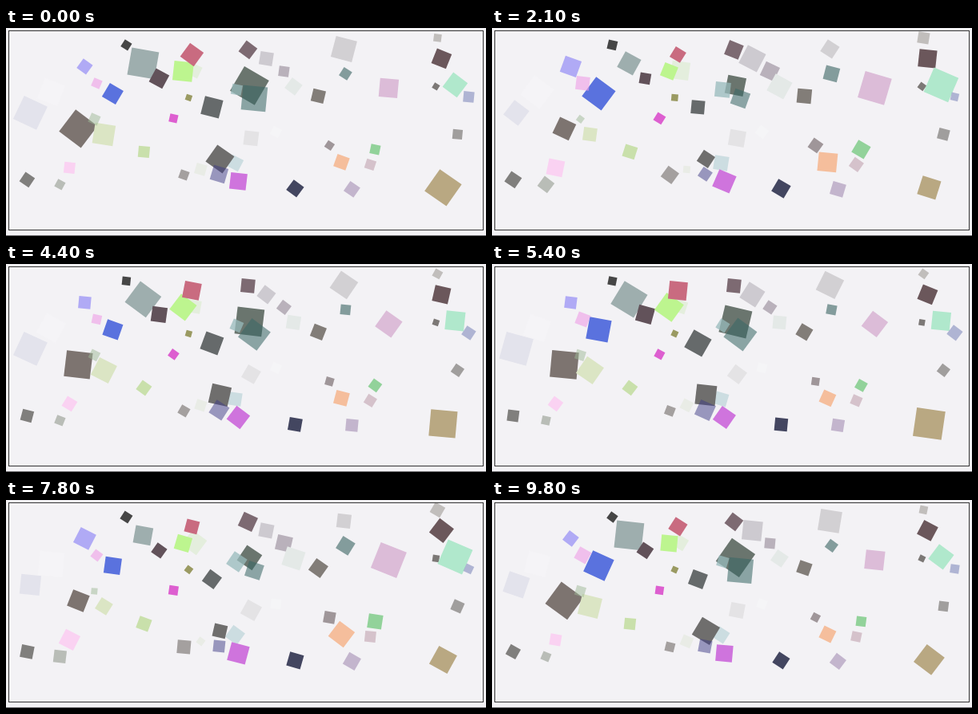
An HTML page with a canvas for the animation above (9900 ms loop, 600x261 px).

```html
<!DOCTYPE html>
<html>
<head>
<meta charset="utf-8">
<style>
html, body { margin: 0; height: 100%; overflow: hidden; background: #f3f2f5; }
canvas { display: block; }
</style>
</head>
<body>
<canvas id="stage" width="600" height="261"></canvas>
<script>
const ctx = document.getElementById('stage').getContext('2d');
const LOOP = 9.9, STEP = 0.1, GOLDEN = 2.4;

// Each group breathes together; a square is [x, y, mean size, colour].
const groups = [
  { swing: 0.06, peak: 2.5, period: 5, squares: [
    [56, 80, 29, '#f5f4f7'], [150, 21, 11, '#464646'], [172, 155, 15, '#c9e0ab'],
    [26, 190, 15, '#807f7d'], [228, 87, 8, '#9a9a62'], [209, 113, 11, '#dd5fd0'],
    [302, 27, 18, '#7d6a72'], [306, 138, 19, '#e4e3e5'], [337, 130, 12, '#f5f5f7'],
    [286, 169, 17, '#ccdde1'], [290, 192, 22, '#cf74dd'], [361, 201, 17, '#434660'],
    [390, 85, 17, '#827d78'], [455, 171, 13, '#d5c2cb'], [432, 202, 16, '#c3b5cd'],
    [564, 133, 13, '#a09e9d'], [537, 73, 8, '#7c7876'], [544, 38, 21, '#6b575b'],
  ] },
  { swing: 0.23, peak: 0, period: 5, squares: [
    [171, 44, 28, '#9eaeae'], [90, 126, 28, '#7d7470'], [122, 133, 21, '#dbe5c4'],
    [110, 114, 10, '#9eb89680'], [304, 72, 29, '#6a756e'], [310, 88, 25, '#3968668f'],
    [267, 164, 21, '#6f6e6d'], [243, 177, 11, '#e9ece6'], [422, 26, 22, '#d2d0d3'],
  ] },
  { swing: 0.2, peak: 2.4, period: 5.2, squares: [
    [98, 48, 18, '#b0aaf5'], [79, 175, 17, '#fad2f2'], [67, 196, 13, '#b9bdb7'],
    [235, 53, 19, '#e4eedd'], [347, 54, 16, '#b9b1bb'], [359, 73, 20, '#e4e9e7'],
    [288, 77, 16, '#98babbc0'], [222, 184, 14, '#a4a09f'], [424, 57, 15, '#839c9c'],
    [478, 75, 29, '#dcbcd8'], [404, 147, 12, '#9f9699'], [419, 168, 20, '#f5be9c'],
    [461, 152, 15, '#92d29a'], [561, 71, 28, '#b0e8cc'], [539, 12, 12, '#c1bebc'],
  ] },
  { swing: 0.2, peak: 5.4, period: 6.4, squares: [
    [30, 106, 29, '#e3e3ec'], [191, 63, 17, '#62525a'], [221, 54, 22, '#bdf58f'],
    [232, 33, 19, '#c96b80'], [257, 99, 21, '#666a6b'], [266, 183, 17, '#3e3a8680'],
    [546, 200, 30, '#b9a882'], [578, 86, 12, '#7682b68c'],
  ] },
  { swing: 0.22, peak: 1.9, period: 4.2, squares: [
    [133, 82, 25, '#5a72de'], [113, 69, 14, '#ee9de699'], [325, 38, 21, '#cdcad0'],
  ] },
];

function drawSquare(x, y, size, tilt, color) {
  ctx.save();
  ctx.translate(x + 0.4, y + 0.4);
  ctx.rotate(tilt);
  ctx.fillStyle = color;
  ctx.fillRect(-size / 2, -size / 2, size, size);
  ctx.restore();
}

function draw(now) {
  const time = Math.floor(now / 1000 % LOOP / STEP) * STEP;
  ctx.fillStyle = '#f3f2f5';
  ctx.fillRect(0, 0, 600, 261);

  let index = 0;
  for (const { swing, peak, period, squares } of groups) {
    const scale = 1 + swing * Math.cos(2 * Math.PI * (time - peak) / period);
    for (const [x, y, size, color] of squares) {
      const tilt = 0.37 + 0.28 * Math.sin(time * 0.6 + index++ * GOLDEN);
      drawSquare(x, y, size * scale, tilt, color);
    }
  }

  ctx.strokeStyle = '#333';
  ctx.strokeRect(3.5, 3.5, 593, 250);
  ctx.fillStyle = '#6a6a6c';
  ctx.fillRect(0, 260, 600, 1);
  requestAnimationFrame(draw);
}
requestAnimationFrame(draw);
</script>
</body>
</html>
```
